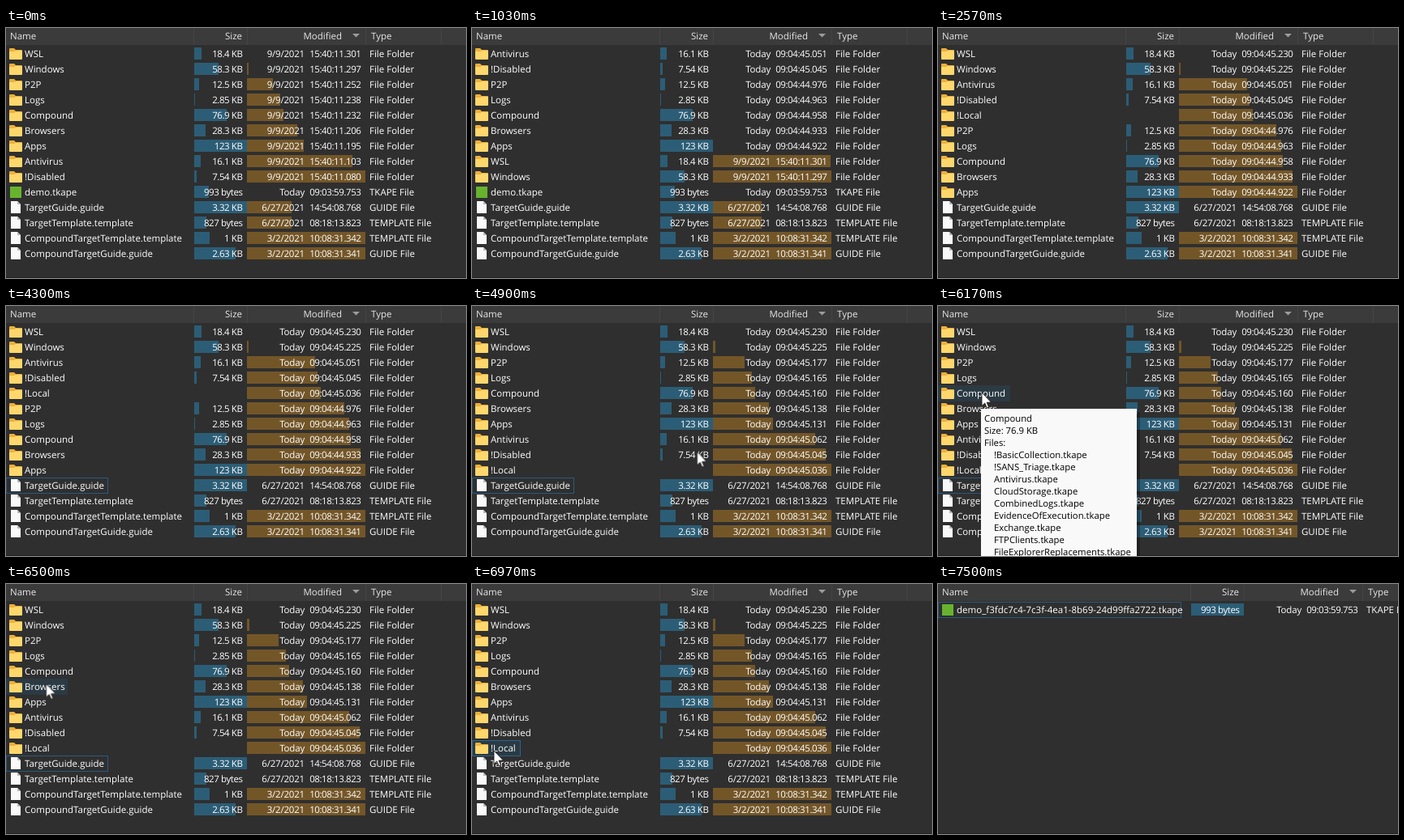
An HTML page that plays this animation: 567x309 px, repeating every 8000 ms.

```html
<!DOCTYPE html>
<html lang="en">
<head>
<meta charset="utf-8">
<title>File list</title>
<style>
html, body { margin: 0; width: 100%; height: 100%; overflow: hidden; background: #2f2f2f; }
svg { display: block; width: 100%; height: 100%; }
text {
  font: 11.5px "Open Sans", "Noto Sans", sans-serif;
  fill: #fff;
  text-rendering: geometricPrecision;
}
.num { letter-spacing: -.42px; text-anchor: end; }
.date { letter-spacing: -.2px; text-anchor: end; }
.end { text-anchor: end; }
.head { fill: #e6e6e6; }
.tip text { fill: #000; font-size: 11.3px; }
.focus { fill: none; stroke: #295a7e; }

.anim { animation: 8s step-end infinite; }
#v1 { animation-name: v1; }
#v2 { animation-name: v2; }
#v3 { animation-name: v3; }
#v4 { animation-name: v4; }
#v5 { animation-name: v5; }
#focus { animation-name: focus; }
#tip { animation-name: tip; }
#hover { animation-name: hover; }
#cursor { animation-name: cursor; }

@keyframes v1 { 0% { opacity: 0 } 6.25%, 100% { opacity: 1 } }
@keyframes v2 { 0% { opacity: 0 } 12.875%, 100% { opacity: 1 } }
@keyframes v3 { 0% { opacity: 0 } 32.125%, 100% { opacity: 1 } }
@keyframes v4 { 0% { opacity: 0 } 58.75%, 100% { opacity: 1 } }
@keyframes v5 { 0% { opacity: 0 } 90.375%, 100% { opacity: 1 } }
@keyframes focus { 0% { opacity: 0 } 53.75% { opacity: 1 } 87.125%, 100% { opacity: 0 } }
@keyframes tip { 0% { opacity: 0 } 77.125% { opacity: 1 } 80.375%, 100% { opacity: 0 } }

/* the highlight follows the row under the pointer */
@keyframes hover {
  0% { opacity: 0; width: 88px; transform: translateY(98px); stroke: #2b3a43 }
  65.375% { opacity: 1; width: 88px; transform: translateY(98px); stroke: #2b3a43 }
  81.21% { opacity: 1; width: 75px; transform: translateY(117px); stroke: #2b3a43 }
  82.04% { opacity: 1; width: 55px; transform: translateY(136px); stroke: #2b3a43 }
  82.875% { opacity: 1; width: 75px; transform: translateY(155px); stroke: #2b3a43 }
  84.54% { opacity: 1; width: 76px; transform: translateY(174px); stroke: #2b3a43 }
  85.375% { opacity: 1; width: 59px; transform: translateY(193px); stroke: #2b3a43 }
  87.125%, 100% { opacity: 1; width: 59px; transform: translateY(193px); stroke: #2b6590 }
}
@keyframes cursor {
  0% { transform: translate(-40px, -40px) }
  58.75% { transform: translate(510px, 271px); animation-timing-function: steps(4) }
  62.0625% { transform: translate(200px, 150px); animation-timing-function: steps(4) }
  65.375% { transform: translate(70px, 101px) }
  68.75% { transform: translate(60px, 105px) }
  69.625% { transform: translate(54px, 107px) }
  80.375% { transform: translate(54px, 107px); animation-timing-function: steps(6) }
  85.375% { transform: translate(27px, 206px) }
  90.375% { transform: translate(27px, 206px); animation-timing-function: steps(4) }
  93.75%, 100% { transform: translate(20px, 312px) }
}
</style>
</head>
<body>
<svg id="stage" viewBox="0 0 567 309" xmlns="http://www.w3.org/2000/svg"></svg>
<script>
const ROW = 19, TOP = 22;

const sizes = {
  WSL: '18.4 KB', Windows: '58.3 KB', P2P: '12.5 KB', Logs: '2.85 KB', Compound: '76.9 KB',
  Browsers: '28.3 KB', Apps: '123 KB', Antivirus: '16.1 KB', '!Disabled': '7.54 KB', '!Local': ''
};

const rect = (x, y, w, h, fill) => `<rect x="${x}" y="${y}" width="${w}" height="${h}" fill="${fill}"/>`;
const text = (x, y, s, cls = '') => `<text x="${x}" y="${y}" class="${cls}">${s}</text>`;

const icons = {
  folder: y => `<path d="M4 ${y + 4}q0-1 1-1h5l2 2h7q1 0 1 1v9H4z" fill="#eeb03a"/>
    <path d="M4 ${y + 7}h6l2-1h8v10q0 1-1 1H5q-1 0-1-1z" fill="#ffd76c"/>`,
  page: y => `<path d="M6 ${y + 2}h8l4 4v11H6z" fill="#f9f9f9"/>
    <path d="M14 ${y + 2}v4h4z" fill="#b9b9b9"/>`,
  square: y => rect(5, y + 3, 14, 14, '#67b32e')
};

const kb = s => s ? parseFloat(s) / (s.includes('bytes') ? 1024 : 1) : 0;

// "Name:seconds" list; seconds starting with 11 belong to the older copy
const folders = list => list.split(' ').map(item => {
  const [name, sec] = item.split(':'), old = sec.startsWith('11');
  return {
    name, size: sizes[name], type: 'File Folder', icon: 'folder',
    date: old ? '9/9/2021' : 'Today', time: (old ? '15:40:' : '09:04:') + sec,
    age: (old ? 1e6 : 0) - sec
  };
});

const demo = name => ({
  name, size: '993 bytes', date: 'Today', time: '09:03:59.753', type: 'TKAPE File', icon: 'square', age: 0
});

const files = mid => [
  ['TargetGuide.guide', '3.32 KB', '6/27/2021', '14:54:08.768', 'GUIDE', mid],
  ['TargetTemplate.template', '827 bytes', '6/27/2021', '08:18:13.823', 'TEMPLATE', mid],
  ['CompoundTargetTemplate.template', '1 KB', '3/2/2021', '10:08:31.342', 'TEMPLATE', 1],
  ['CompoundTargetGuide.guide', '2.63 KB', '3/2/2021', '10:08:31.341', 'GUIDE', 1]
].map(([name, size, date, time, kind, age]) =>
  ({ name, size, date, time, type: kind + ' File', icon: 'page', age }));

// bars are scaled inside each group: folders and files apart
function scale(group) {
  const ages = group.map(r => r.age), min = Math.min(...ages), span = Math.max(...ages) - min;
  const max = Math.max(...group.map(r => kb(r.size)));
  return group.map(r => ({ ...r, sizeBar: kb(r.size) / max, dateBar: span ? (r.age - min) / span : 0 }));
}

function drawRow(r, i, dx) {
  const y = TOP + i * ROW, base = y + 14;
  return rect(232 + dx, y + 2, Math.floor(r.sizeBar * 65), 15, '#2c5d76') +
    rect(297 + dx, y + 2, Math.floor(r.dateBar * 146), 15, '#735628') +
    icons[r.icon](y) +
    text(23, base, r.name) +
    text(291.5 + dx, base, r.size, 'num') +
    text(368 + dx, base, r.date, 'date') +
    text(437.5 + dx, base, r.time, 'num') +
    text(448 + dx, base, r.type);
}

function view(id, groups, { dx = 0, under = '' } = {}) {
  const rows = groups.flatMap(scale);
  return `<g id="v${id}" class="${id ? 'anim' : ''}">` +
    rect(0, 0, 567, 309, '#2f2f2f') + rect(0, 0, 567, 21, '#3b3b3b') + rect(0, 308, 567, 1, '#222') +
    [231, 297, 443, 536].map(x => rect(x + dx, 0, 1, 21, '#444')).join('') +
    text(5, 14, 'Name', 'head') +
    text(291 + dx, 14, 'Size', 'head end') +
    text(414 + dx, 14, 'Modified', 'head end') +
    text(450 + dx, 14, 'Type', 'head') +
    `<path d="M${427 + dx} 7h9l-4.500 4.500z" fill="#9b9b9b"/>` +
    under + rows.map((r, i) => drawRow(r, i, dx)).join('') + '</g>';
}

const tipLines = ['!BasicCollection', '!SANS_Triage', 'Antivirus', 'CloudStorage', 'CombinedLogs',
  'EvidenceOfExecution', 'Exchange', 'FTPClients', 'FileExplorerReplacements'];

const tooltip = `<g id="tip" class="anim tip">` +
  rect(57, 131, 192, 180, 'rgba(0,0,0,.3)') +
  rect(53, 127, 192, 190, '#f9f9f9') +
  ['Compound', 'Size: 76.9 KB', 'Files:'].map((s, i) => text(57, 143 + i * 15, s)).join('') +
  tipLines.map((s, i) => text(69, 188 + i * 15, s + '.tkape')).join('') + '</g>';

const outline = (y, w, attrs) => `<rect x=".5" y="${y + .5}" width="${w}" height="19" ${attrs}/>`;
const hover = outline(0, 88, 'id="hover" class="anim" fill="#2b3a43"');
const pointer = `<path id="cursor" class="anim" d="M0 0V16.500L3.700 13L6.200 18.700L8.500 17.700L6.100 12.200L11.500 12Z"
  fill="#fff" stroke="#111" stroke-width=".8"/>`;

const demoFile = demo('demo.tkape');

document.getElementById('stage').innerHTML =
  view(0, [folders('WSL:11.301 Windows:11.297 P2P:11.252 Logs:11.238 Compound:11.232 Browsers:11.206 Apps:11.195 Antivirus:11.103 !Disabled:11.080'),
    [demoFile, ...files(.38)]]) +
  view(1, [folders('Antivirus:45.051 !Disabled:45.045 WSL:11.301 Windows:11.297 P2P:11.252 Logs:11.238 Compound:11.232 Browsers:11.206 Apps:11.195'),
    [demoFile, ...files(.415)]]) +
  view(2, [folders('Antivirus:45.051 !Disabled:45.045 P2P:44.976 Logs:44.963 Compound:44.958 Browsers:44.933 Apps:44.922 WSL:11.301 Windows:11.297'),
    [demoFile, ...files(.415)]]) +
  view(3, [folders('WSL:45.230 Windows:45.225 Antivirus:45.051 !Disabled:45.045 !Local:45.036 P2P:44.976 Logs:44.963 Compound:44.958 Browsers:44.933 Apps:44.922'),
    files(.4)]) +
  view(4, [folders('WSL:45.230 Windows:45.225 P2P:45.177 Logs:45.165 Compound:45.160 Browsers:45.138 Apps:45.131 Antivirus:45.062 !Disabled:45.045 !Local:45.036'),
    files(.4)], { under: hover }) +
  outline(212, 125, 'id="focus" class="anim focus"') +
  tooltip +
  view(5, [[demo('demo_f3fdc7c4-7c3f-4ea1-8b69-24d99ffa2722.tkape')]],
    { dx: 80, under: outline(22, 299, 'class="focus"') }) +
  pointer;
</script>
</body>
</html>
```
